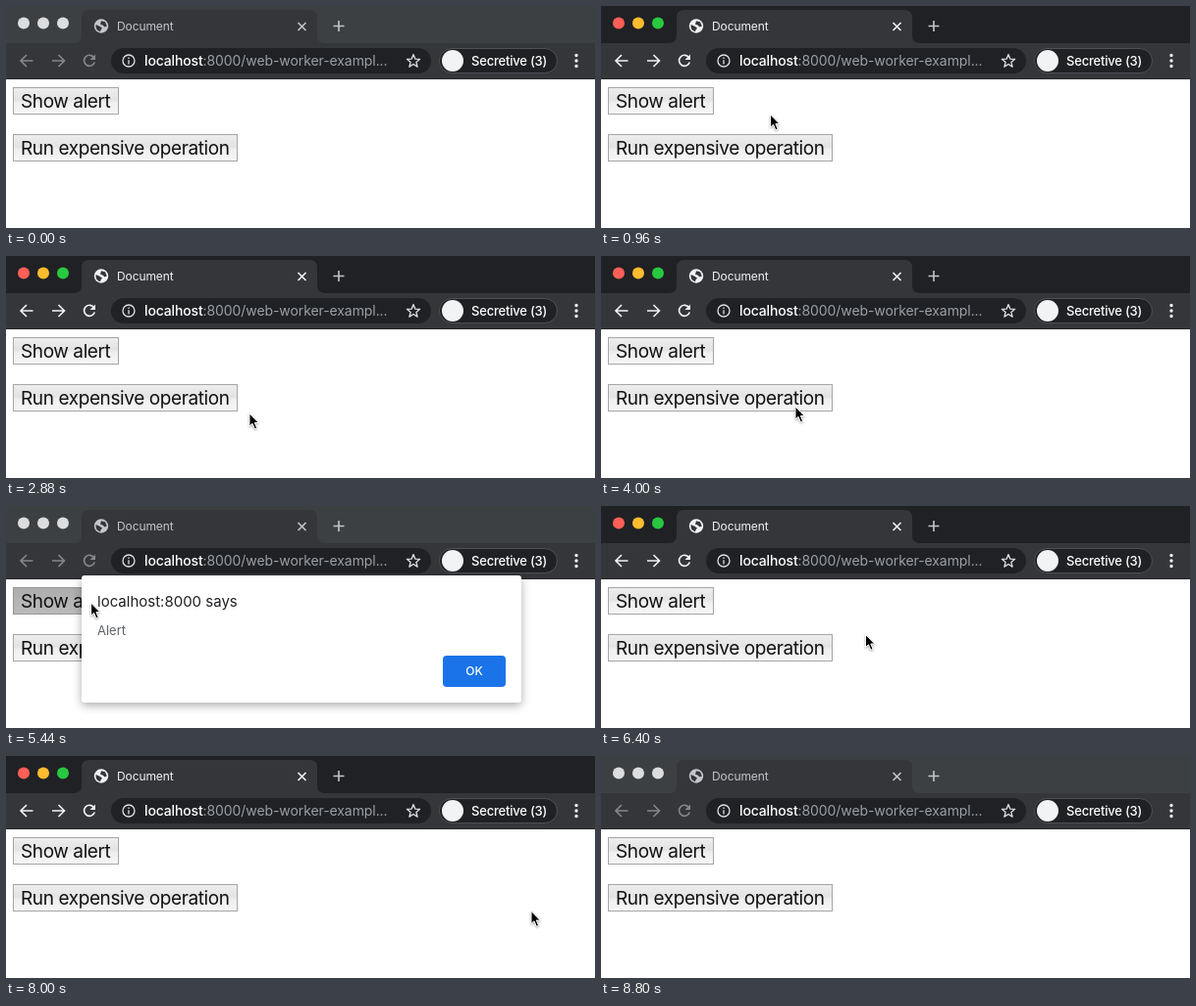
These frames come from a looping animation (600 px wide and 227 px high, 9120 ms). An HTML page:

```html
<!DOCTYPE html>
<html lang="en">
<head>
<meta charset="utf-8">
<title>Document</title>
<style>
  html, body { margin: 0; height: 100%; overflow: hidden; background: #fff; }
  svg { display: block; width: 600px; height: 227px; font-family: Inter, Roboto, sans-serif; }
  text { white-space: pre; }
  .line { fill: none; stroke-width: 1.6; }
  .thin { fill: none; stroke-width: 1.3; stroke: #dfe1e5; stroke-linejoin: round; }
  #win { --strip: #3c4043; --title: #c3c6ca; --nav: #85878b; --a: #dcddde; --b: #dcddde; --c: #dcddde; }
  #win.active { --strip: #202124; --title: #f1f3f4; --nav: #f1f3f4; --a: #ff5f57; --b: #febc2e; --c: #28c840; }
  #win.opening { --title: #f1f3f4; --a: #cecfd0; --b: #cecfd0; --c: #cecfd0; }
  .btn rect { fill: url(#up); stroke: #a6a6a6; }
  .btn.down rect { fill: url(#down); stroke: #969696; }
  .btn text { font-size: 19px; letter-spacing: -.4px; fill: #111; }
  #panel { filter: drop-shadow(0 3px 5px rgba(0, 0, 0, .32)); }
  #alert { transform-origin: 301px 136px; }
  #alert.opening { opacity: .07; transform: translate(3px, -21px) scaleX(.96); }
  #alert.opening #panel { filter: none; }
  #cursor { filter: drop-shadow(0 1px 1px rgba(0, 0, 0, .35)); }
</style>
</head>
<body>
<svg viewBox="0 0 600 227">
  <defs>
    <linearGradient id="up" x2="0" y2="1">
      <stop stop-color="#eeeeee"/><stop offset=".45" stop-color="#e3e3e3"/>
      <stop offset=".58" stop-color="#f0f0f0"/><stop offset="1" stop-color="#f5f5f5"/>
    </linearGradient>
    <linearGradient id="down" x2="0" y2="1">
      <stop stop-color="#adadad"/><stop offset="1" stop-color="#bababa"/>
    </linearGradient>
  </defs>

  <rect width="600" height="227" fill="#fff"/>

  <g id="win">
    <!-- tab strip -->
    <rect width="600" height="39" fill="var(--strip)"/>
    <circle cx="18" cy="17.5" r="6" fill="var(--a)"/>
    <circle cx="38" cy="17.5" r="6" fill="var(--b)"/>
    <circle cx="58" cy="17.5" r="6" fill="var(--c)"/>
    <path fill="#35363a" d="M0 38H69Q77 38 77 30V12Q77 4 85 4H309Q317 4 317 12V30Q317 38 325 38H600V75H0Z"/>
    <rect y="74" width="600" height="1" fill="#28292c"/>
    <circle cx="97" cy="20.5" r="7.2" fill="var(--title)"/>
    <path fill="#35363a" d="M91.5 19L95 20.5 98 22.5 96.5 24.5 96 26.3Q91 25 91.5 19ZM97 15.3L101 16.3 102.8 20.5 100.5 21.5 98.5 19.5 96 18.8Z"/>
    <text x="113" y="25" font-size="12" letter-spacing="-.1" fill="var(--title)">Document</text>
    <path class="line" stroke="var(--title)" d="M297.5 17l8 8m0-8l-8 8"/>
    <path class="line" stroke="#c3c6ca" d="M333.5 20.5h11m-5.5-5.5v11"/>

    <!-- toolbar -->
    <path class="line" stroke="var(--nav)" d="M27.5 56H15.5M21 50l-6 6 6 6"/>
    <path class="line" stroke="var(--nav)" d="M47 56H59M53.5 50l6 6-6 6"/>
    <path class="line" stroke="var(--nav)" d="M89.8 53A5.5 5.5 0 1 0 90.3 57.5"/>
    <path fill="var(--nav)" d="M91 49.5v5.5h-5.5z"/>
    <rect x="107" y="43" width="326" height="26" rx="13" fill="#202124"/>
    <circle class="thin" cx="125" cy="56" r="6"/>
    <path class="thin" d="M125 52.5v1.5M125 55.2v4.300"/>
    <text x="141" y="61" font-size="14" font-weight="500" letter-spacing="-.15" fill="#fff">localhost<tspan font-weight="400" letter-spacing="-.08" fill="#9aa0a6">:8000/web-worker-exampl...</tspan></text>
    <path id="star" class="thin"/>
    <rect x="441.5" y="43.5" width="120" height="25" rx="12.5" fill="#202124" stroke="#4e5054"/>
    <circle cx="455" cy="56" r="11" fill="#f1f3f4"/>
    <text x="474" y="61" font-size="13" font-weight="500" letter-spacing="-.2" fill="#fff">Secretive (3)</text>
    <path stroke="#f1f3f4" stroke-width="3.4" stroke-linecap="round" stroke-dasharray="0 5.5" d="M581 50.500v11.500"/>
  </g>

  <g class="btn" id="show">
    <rect x="7.5" y="83.5" width="107" height="27"/>
    <text x="15" y="104">Show alert</text>
  </g>
  <g class="btn" id="run">
    <rect x="7.5" y="131.5" width="228" height="27"/>
    <text x="15" y="152">Run expensive operation</text>
  </g>

  <g id="alert">
    <rect id="panel" x="77" y="71" width="448" height="130" rx="3" fill="#fff"/>
    <text x="93" y="103" font-size="15" fill="#202124">localhost:8000 says</text>
    <text x="93" y="132" font-size="13" fill="#5f6368">Alert</text>
    <rect x="445" y="153" width="64" height="32" rx="4" fill="#1a73e8"/>
    <text x="477" y="173.3" font-size="12" font-weight="500" text-anchor="middle" fill="#fff">OK</text>
  </g>

  <path id="cursor" fill="#000" stroke="#fff" stroke-linejoin="round"
    d="M0 0V13L3 10.3 5.3 15.8 7.6 14.8 5.3 9.5H9.3Z"/>
</svg>

<script>
const LOOP = 9120, STEP = 160;
const $ = id => document.getElementById(id);
const within = (t, from, to) => t >= from && t < to;

const alerts = [
  { press: 1440, open: 1760, close: 2720 },
  { press: 4960, open: 5280, close: 6080 },
  { press: 6880, open: 7040, close: 7840 }
];

// Places the pointer visits, and when it travels to each
const enter = [560, 167], show = [69, 96], ok = [470, 167], below = [248, 161],
      edge = [202, 160], run = [198, 154], exit = [600, 150];
const moves = [
  [160, 1440, show], [1760, 2480, ok], [2560, 2880, below], [2880, 3360, edge],
  [3680, 3840, run], [4160, 4960, show], [5280, 6000, ok], [6080, 6720, show],
  [6960, 7600, ok], [7840, 8160, exit]
];

const ease = k => k < .5 ? 4 * k ** 3 : 1 - 4 * (1 - k) ** 3;

function pointerAt(t) {
  let [x, y] = enter;
  for (const [from, to, place] of moves) {
    const k = ease(Math.min(1, Math.max(0, (t - from) / (to - from))));
    x += (place[0] - x) * k;
    y += (place[1] - y) * k;
  }
  return [x, y];
}

function draw(now) {
  const t = Math.floor(now % LOOP / STEP) * STEP;
  const open = alerts.some(a => within(t, a.open, a.close));
  const opening = alerts.some(a => within(t, a.open, a.open + STEP));
  // The window regains focus one step after an alert closes
  const blurred = alerts.some(a => within(t, a.open, a.close + STEP));

  $("win").classList.toggle("active", within(t, 320, 8800) && !blurred);
  $("win").classList.toggle("opening", opening);
  $("show").classList.toggle("down", alerts.some(a => within(t, a.press, a.close)));
  $("run").classList.toggle("down", within(t, 3840, 4000));
  $("alert").style.display = open ? "" : "none";
  $("alert").classList.toggle("opening", opening);
  $("cursor").style.display = within(t, 160, 8160) ? "" : "none";
  $("cursor").setAttribute("transform", `translate(${pointerAt(t)})`);
}

const starPoints = Array.from({ length: 10 }, (_, i) => {
  const a = i * Math.PI / 5, r = i % 2 ? 3 : 7;
  return [415 + r * Math.sin(a), 56.5 - r * Math.cos(a)];
});
$("star").setAttribute("d", `M${starPoints.join("L")}Z`);

const start = performance.now();
function tick() {
  draw(performance.now() - start);
  requestAnimationFrame(tick);
}
tick();
</script>
</body>
</html>
```
